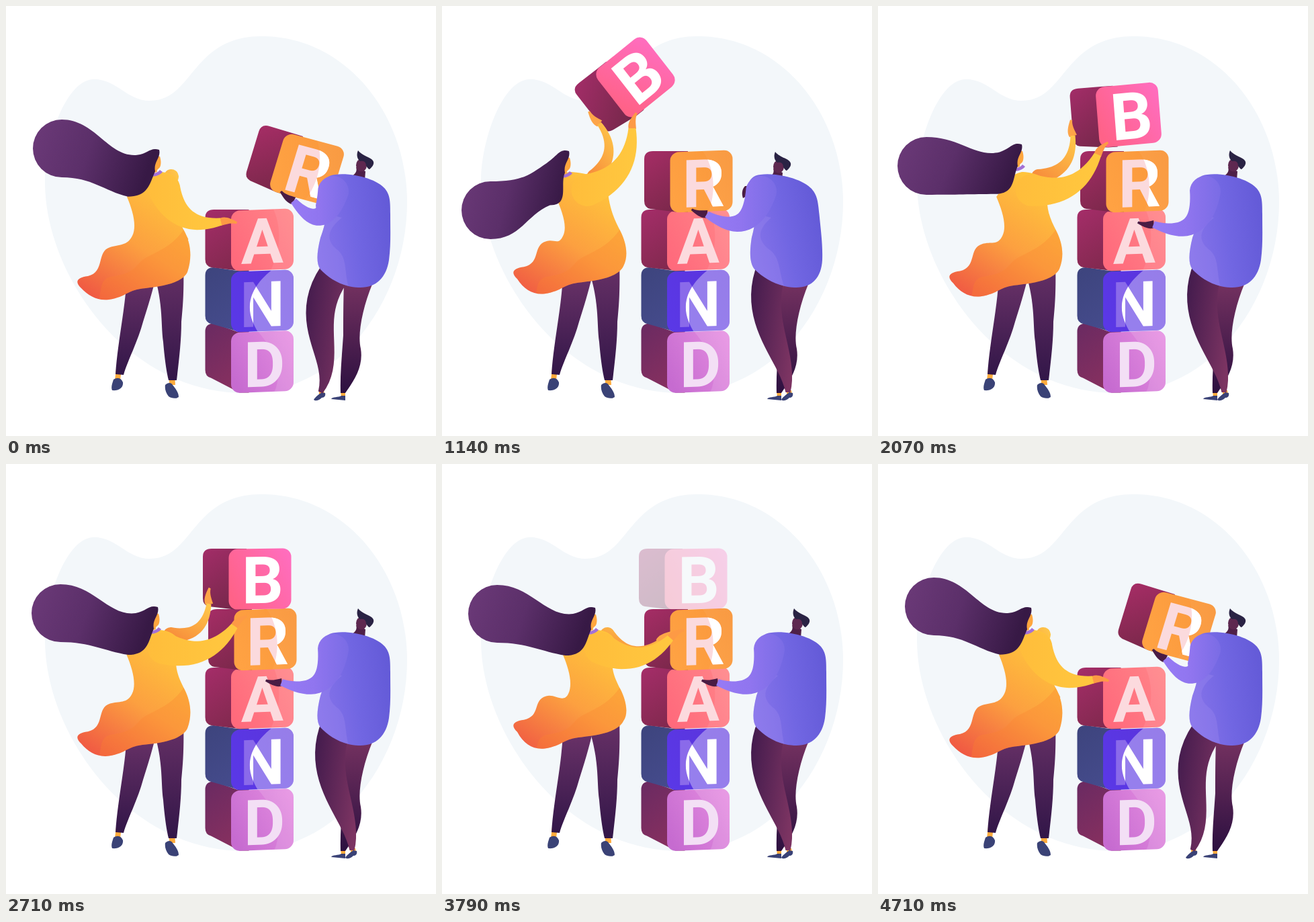
Recreate the animation shown at these times as an HTML page. Size 640 px wide and 640 px high, loop 4.78 s.

```html
<!DOCTYPE html>
<html lang="en">
<head>
<meta charset="utf-8">
<title>Stacking letter cubes</title>
<style>
  html, body { margin: 0; width: 100%; height: 100%; overflow: hidden; background: #fff; }
  svg { display: block; width: 100%; height: 100%; }
  text { font: 700 94px Roboto, sans-serif; text-anchor: middle; }
</style>
</head>
<body>
<svg id="stage" viewBox="0 0 640 640"></svg>
<script>
const LOOP = 4780;

const grad = (id, [x1, y1, x2, y2], colors, units = 'objectBoundingBox') =>
  `<linearGradient id="${id}" gradientUnits="${units}" x1="${x1}" y1="${y1}" x2="${x2}" y2="${y2}">` +
  colors.map((c, i) => `<stop offset="${i / (colors.length - 1)}" stop-color="${c}"/>`).join('') +
  '</linearGradient>';

// A cube centred on its front face. Inside the lit area the face is lighter, and the letter may turn white.
function cube({ letter, at, slope, side, front, lit, glow, dim, bright, y, dx = 0, size = 94, tilt = -2 }) {
  const top = -45 - slope, bottom = 39 - slope * 1.4;
  const place = `x="${dx}" y="${y}" style="font-size:${size}px"`;
  return `<g id="cube${letter}" transform="translate(${at})">
    ${grad('side' + letter, [0, 0, 0.5, 1], side)}${grad('front' + letter, [0, 0.7, 1, 0.2], front)}
    <clipPath id="lit${letter}"><path d="${lit}"/></clipPath>
    <path fill="url(#side${letter})" d="M-20 -45H-38L-72 ${top}Q-85 ${top} -85 ${top + 12}V${bottom - 10}Q-85 ${bottom} -76 ${bottom + 2}L-34 46H-20Z"/>
    <g transform="skewY(${tilt})">
      <rect x="-46.500" y="-45" width="93" height="90" rx="13" fill="url(#front${letter})"/>
      <path d="${lit}" fill="#fff" opacity="${glow}" clip-path="url(#face)"/>
      <text ${place} fill="${dim}">${letter}</text>
      ${bright ? `<text ${place} fill="#fff" clip-path="url(#lit${letter})">${letter}</text>` : ''}
    </g></g>`;
}

const cubes = [
  { letter: 'D', at: '381.5 529.5', slope: 12, side: ['#6a2a62', '#87305f'], front: ['#c66bd0', '#e48ce0'],
    lit: 'M-10 -50C5 -30 38 5 16 50H50V-50Z', glow: .12, dim: '#f3dff5', y: 37, dx: 3 },
  { letter: 'N', at: '381.5 439', slope: 5, side: ['#3d447d', '#454b8c'], front: ['#5a38e6', '#5a34dc'],
    lit: 'M20 -50C-30 -15 -24 20 -4 50H50V-50Z', glow: .36, dim: '#8a6aea', y: 38, bright: true },
  { letter: 'A', at: '381.5 348', slope: 0, side: ['#a52d69', '#82294f'], front: ['#ff6a7c', '#ff8488'],
    lit: 'M14 -50C30 -20 28 20 10 50H50V-50Z', glow: .08, dim: '#fcdade', y: 35 },
  { letter: 'R', at: '386 261', slope: 0, side: ['#a62d66', '#7d284c'], front: ['#ffa243', '#f9973b'],
    lit: 'M-2 -50C20 -25 24 20 8 50H50V-50Z', glow: .04, dim: '#fbdadd', y: 38, dx: 3, size: 99, bright: true },
  { letter: 'B', at: '378 171', slope: 0, side: ['#a32d68', '#78284c'], front: ['#ff6288', '#ff6dbd'],
    lit: 'M-50 -50H50V50H-50Z', glow: 0, dim: '#fff', y: 36, dx: 4, size: 97, tilt: -1 },
];

const HAND = 'M-2 -5C5 -9 13 -7 24 -3L23 0C15 -1 8 3 1 6Z';

document.getElementById('stage').innerHTML = `
<defs>
  ${grad('shirtFill', [245, 270, 135, 435], ['#ffc43c', '#fca040', '#f05a43'], 'userSpaceOnUse')}
  ${grad('armFill', [0, 0, 1, 0], ['#ffbd3b', '#ffc83f'])}
  ${grad('farArmFill', [1, 0, 0.3, 1], ['#ffcb4a', '#f78b3b'])}
  ${grad('hairFill', [0, 0, 1, 0.2], ['#6c3a79', '#5b2f69', '#371945'])}
  ${grad('legFill', [0, 0, 0, 1], ['#6a3268', '#321648'])}
  ${grad('manLegFill', [0, 0.3, 1, 0.7], ['#451c4e', '#7c3462'])}
  ${grad('manBackLegFill', [0.4, 0, 0.4, 1], ['#743160', '#2c1040'])}
  ${grad('torsoFill', [0, 0.5, 1, 0.3], ['#8673ea', '#7166e2', '#635ad7'])}
  ${grad('manArmFill', [0, 0.4, 1, 0.4], ['#977bf5', '#9075ef', '#7a6ce5'])}
  <clipPath id="face"><rect x="-46.500" y="-45" width="93" height="90" rx="13"/></clipPath>
  <clipPath id="shirtShape"><use href="#shirt"/></clipPath>
  <clipPath id="torsoShape"><use href="#torso"/></clipPath>
</defs>

<path fill="#f3f7fa" d="M131 109C165 109 180 141 214 141C280 141 275 45 381 45C505 45 597 160 597 292C597 434 500 576 355 576C180 576 58 400 58 262C58 200 90 109 131 109Z"/>

${cubes.map(cube).join('')}

<path id="manFarHand" fill="#4a1c44" d="M0 -9C-5 -4 -5 4 -3 9L4 5V-9Z"/>
<path fill="#ffab3c" d="M498 573H505V582H499Z"/>
<path fill="#3a4276" d="M505 580V587L484 585C486 581 495 583 499 580Z"/>
<path fill="url(#manBackLegFill)" d="M503 412C502 440 502 470 502 490C500 520 497 550 498 576H505C520 555 532 535 528 510C523 490 530 450 546 412Z"/>
<g id="manShoe">
  <path fill="#ffab3c" d="M466 572H473L474 578H466Z"/>
  <path fill="#3a4276" d="M475 576C476 580 474 583 470 583C465 588 460 588 458 586C460 582 467 577 470 575Z"/>
</g>
<path id="manLeg" fill="url(#manLegFill)"/>
<g id="manHead">
  <path fill="#4f2048" d="M521 240L535 246L534 259L514 254C520 250 523 246 521 240Z"/>
  <ellipse cx="529" cy="237" rx="8" ry="9.500" fill="#5e2850"/>
  <path fill="#2a2344" d="M524 215C521 222 523 228 527 231C531 230 536 231 536 238C538 241 540 243 541 243C546 239 549 234 546 230C543 225 530 223 524 215Z"/>
</g>
<g id="manBody">
  <path id="torso" fill="url(#torsoFill)" d="M490 251C510 248 545 255 560 268C572 278 572 290 572 310C572 335 573 355 570 378C566 405 550 420 525 419C500 418 480 405 468 392C461 383 463 365 468 345C475 325 480 310 470 290C464 272 472 252 490 251Z"/>
  <path fill="#9a86ee" opacity=".35" clip-path="url(#torsoShape)" d="M500 315C475 335 478 350 492 362C510 375 502 398 512 425H440V300Z"/>
</g>
<path id="manHand" fill="#4a1c44" d="${HAND}"/>
<path id="manArm" fill="url(#manArmFill)"/>

<path id="farHand" fill="#fda548" d="${HAND}"/>
<path id="farArm" fill="url(#farArmFill)"/>
<path fill="#ffab3c" d="M164 540H172L170 557H162ZM243 548H251L252 564H243Z"/>
<path fill="#3a4276" d="M160 556C166 552 171 553 174 560C175 568 168 573 158 572C156 568 158 562 160 556ZM237 564C241 560 246 560 248 564C253 570 257 576 257 582C253 585 246 584 242 581C238 576 236 570 237 564Z"/>
<g fill="url(#legFill)">
  <path d="M180 400C178 450 166 500 163 548L175 549C180 530 196 500 204 470C212 445 218 425 224 400Z"/>
  <path d="M216 385C235 440 230 470 234 500C236 525 239 545 242 557H254C257 530 261 500 261 470C264 440 265 420 264 375Z"/>
</g>
<path id="shirt" fill="url(#shirtFill)"/>
<path fill="#f7802f" opacity=".3" clip-path="url(#shirtShape)" d="M138 442C142 420 140 408 155 403C175 400 185 398 198 383C210 368 245 365 266 330H285V442Z"/>
<path id="nearHand" fill="#fd9a45" d="${HAND}"/>
<path id="nearArm" fill="url(#armFill)"/>
<g id="head">
  <path fill="#ffa63e" d="M222 222L229 224C231 230 231 236 229 240C227 243 224 243 225 247L214 250L212 235Z"/>
  <path fill="#a371d6" d="M216 253C222 255 230 251 233 247L229 244C226 248 222 249 217 249Z"/>
</g>
<path id="hair" fill="url(#hairFill)"/>`;

const set = (id, attr, value) => document.getElementById(id).setAttribute(attr, value);
const move = (id, x, y, angle = 0) => set(id, 'transform', `translate(${x} ${y}) rotate(${angle})`);

// Blends numbers or nested arrays of numbers.
const mix = (a, b, k) => Array.isArray(a) ? a.map((v, i) => mix(v, b[i], k)) : a + (b - a) * k;

// Value of a looping list of [time, value] keys, eased between neighbours.
function at(keys, t) {
  const next = keys.findIndex(([time]) => time > t);
  const [t1, b] = next < 0 ? [LOOP, keys[0][1]] : keys[next];
  const [t0, a] = keys.at(next < 0 ? -1 : next - 1);
  const k = (t - t0) / (t1 - t0);
  return mix(a, b, k * k * (3 - 2 * k));
}

const bezier = (points, t) => points.length === 1 ? points[0]
  : bezier(points.slice(1).map((p, i) => mix(points[i], p, t)), t);

// Tapered outline around a curve, round at its start.
function limb(points, w0, w1, power = 1, steps = 20) {
  const out = [], back = [];
  for (let i = 0; i <= steps; i++) {
    const t = i / steps, [x, y] = bezier(points, t);
    const [[ax, ay], [bx, by]] = [t - .01, t + .01].map(s => bezier(points, s));
    const r = (w0 + (w1 - w0) * t ** power) / 2 / Math.hypot(bx - ax, by - ay);
    const nx = (ay - by) * r, ny = (bx - ax) * r;
    out.push([x + nx, y + ny]);
    back.unshift([x - nx, y - ny]);
  }
  return `M${out.join('L')}L${back.join('L')}A${w0 / 2} ${w0 / 2} 0 0 0 ${out[0]}Z`;
}

// An arm bows sideways by a fixed amount; the hand follows its end.
function reach(name, shoulder, wrist, bend, width, wristWidth, turn) {
  const [dx, dy] = [wrist[0] - shoulder[0], wrist[1] - shoulder[1]];
  const s = bend / Math.hypot(dx, dy);
  const elbow = [shoulder[0] + dx / 2 - dy * s, shoulder[1] + dy / 2 + dx * s];
  const angle = Math.atan2(wrist[1] - elbow[1], wrist[0] - elbow[0]) * 180 / Math.PI;
  set(name + 'Arm', 'd', limb([shoulder, elbow, wrist], width, wristWidth));
  move(name + 'Hand', ...wrist, angle + turn);
}

// Hair runs from the forehead to a round end with radius r.
function hairPath([x, y], [bx, by], r = 43) {
  const drop = by - y;
  const hx = x - 46 + drop * .2, hy = y + 70 + drop * .12;
  return `M${x} ${y}C${x - 14} ${y - 4} ${x - 16} ${y + 6} ${x - 33} ${y + 8 + drop * .11}
    C${x - 75 + drop * .2} ${y + 12 + drop * .25} ${bx + 50} ${by - r} ${bx} ${by - r}
    A${r} ${r} 0 0 0 ${bx} ${by + r}
    C${bx + 45} ${by + r} ${hx - 36} ${hy + (by + r - hy) * .3} ${hx} ${hy}
    C${hx + 30} ${hy} ${x - 14} ${y + 50} ${x - 6} ${y + 32}
    C${x - 9} ${y + 18} ${x + 3} ${y + 12} ${x} ${y}Z`;
}

// The shirt bends with the head and its hem swings up by lift.
function shirtPath(headX, lift) {
  const lean = 228 - headX;
  const back = 180 - lean * .27, waist = 190 - lean * .2, chest = 258 - lean * .3;
  const tail = y => y - lift * 1.25, hem = y => y - lift * .8;
  return `M${back} 284C${back + 9} 305 ${waist + 5} 328 ${waist - 2} 342
    C${waist - 9} 357 168 ${hem(355)} 155 ${hem(359)}C134 ${hem(365)} 148 ${tail(396)} 122 ${tail(402)}
    C105 ${tail(404)} 102 ${tail(411)} 112 ${tail(420)}C122 ${hem(431)} 136 ${hem(439)} 153 ${hem(437)}
    C180 ${hem(433)} 180 ${hem(422)} 208 ${hem(420)}C235 ${hem(417)} 262 ${hem(412)} 270 ${hem(396)}
    C278 372 274 352 266 336C255 315 248 298 ${chest} 268
    C${chest + 1} 256 ${headX + 15} 246 ${headX} 247C${headX - 22} 252 ${back + 10} 270 ${back} 284Z`;
}

// Woman: forehead, hair end, near wrist, far wrist, hem lift.
const lifting = [[189, 216], [72, 304], [283, 182], [234, 175], 11];
const resting = [[228, 214], [83, 212], [320, 321], [252, 333], 0];
const woman = [
  [0, resting],
  [570, [[214, 212], [70, 238], [331, 242], [304, 221], 6]],
  [1140, lifting], [1500, lifting],
  [2070, [[214, 206], [72, 238], [327, 221], [290, 193], 6]],
  [2710, [[226, 213], [81, 222], [340, 241], [302, 208], 3]],
  [3790, [[228, 214], [82, 223], [340, 259], [323, 265], 17]],
  [4680, resting],
];
// Man: lean, wrist.
const pushing = [1, [394, 310]], steadying = [0, [410, 325]], holding = [0, [428, 290]];
const man = [[0, holding], [570, [1, [394, 302]]], [1140, pushing], [1230, pushing],
  [1710, steadying], [3950, steadying], [4570, holding]];
const foot = [[0, 468], [570, 503], [1140, 515], [3860, 515], [4520, 468]];
// Cubes: x, y, angle.
const cubeR = [[0, [448, 243, 17]], [570, [404, 254, 5.5]], [720, [386, 261, 0]], [4080, [386, 261, 0]],
  [4450, [436, 211, 15]], [4720, [448, 243, 17]]];
const cubeB = [[0, [276, 86, -38]], [860, [276, 86, -38]], [1140, [288, 106, -38]], [1640, [300, 109, -33]],
  [2070, [373, 162, -4.5]], [2270, [378, 171, 0]], [4000, [378, 171, 0]]];
const fade = [[0, 0], [860, 0], [1080, 1], [3500, 1], [3950, 0]];

function draw(t) {
  const [head, hairEnd, near, far, lift] = at(woman, t);
  const shoulder = [122 + head[0] / 2, 274];
  set('hair', 'd', hairPath(head, hairEnd));
  set('shirt', 'd', shirtPath(head[0], lift));
  move('head', head[0] - 228, head[1] - 214);
  reach('near', shoulder, near, 42, 48, 11, 20);
  reach('far', [shoulder[0] + 10, 254], far, 36, 22, 7, 0);

  const [lean, wrist] = at(man, t), footX = at(foot, t);
  set('manBody', 'transform', `translate(${-40 * lean} 0) skewX(${5.44 * lean})`);
  move('manHead', -28 * lean, 2 * lean);
  move('manFarHand', 485 - 34 * lean, 277);
  reach('man', [487 - 12 * lean, 276], wrist, -62, 46, 10, -10);
  set('manLeg', 'd', limb([[488, 400], [footX * .55 + 183, 470], [footX * .45 + 284, 520], [footX, 575]], 46, 7, 2));
  move('manShoe', footX - 468, 0);

  move('cubeR', ...at(cubeR, t));
  move('cubeB', ...at(cubeB, t));
  set('cubeB', 'opacity', at(fade, t));
}

const start = performance.now();
function frame() {
  draw((performance.now() - start) % LOOP);
  requestAnimationFrame(frame);
}
frame();
</script>
</body>
</html>
```
